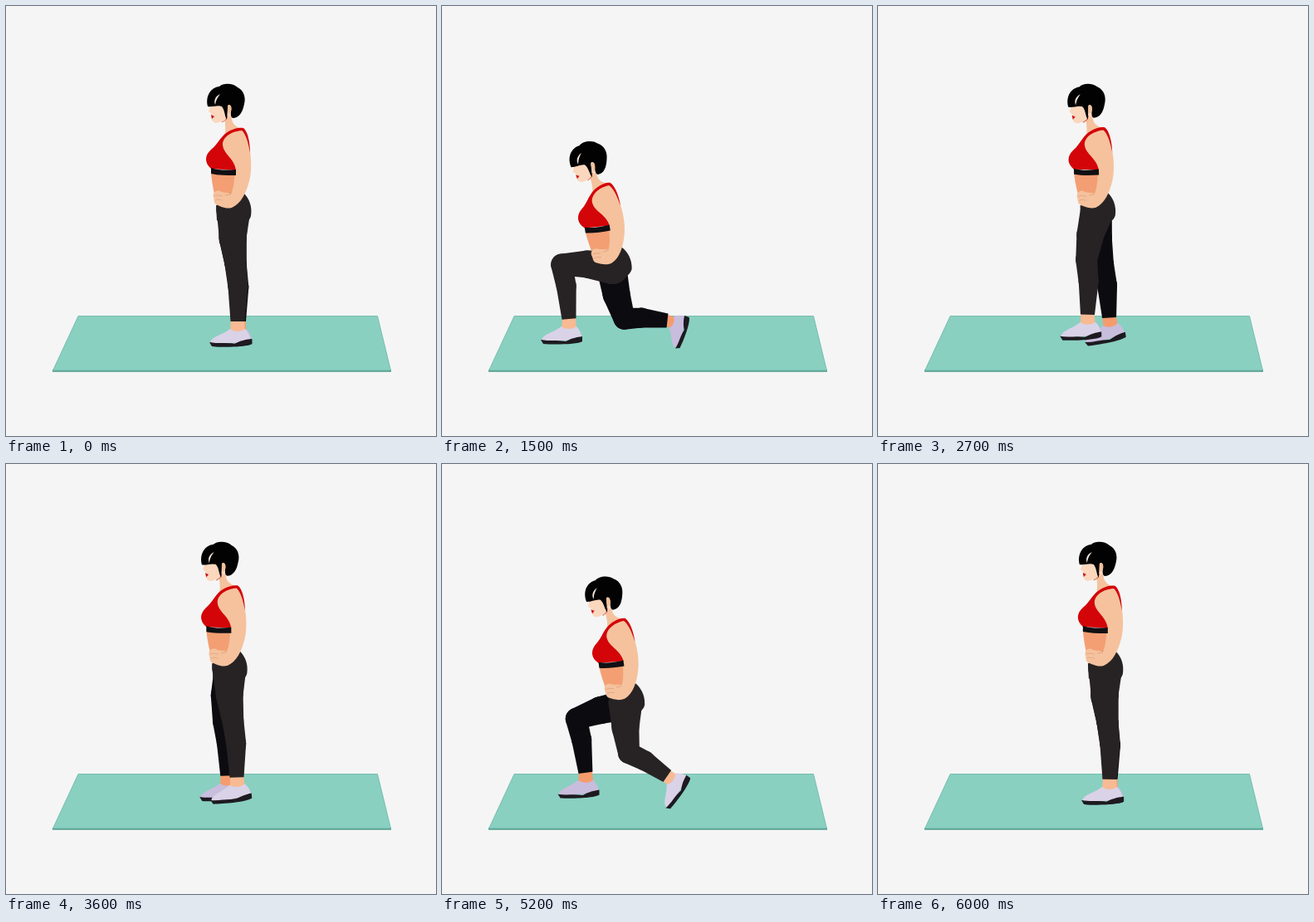
An HTML page with a canvas for the animation above (6200 ms loop, 518 by 518 pixels).

```html
<!DOCTYPE html>
<html lang="en">
<head>
<meta charset="utf-8">
<title>Forward lunges</title>
<style>
  html, body { margin: 0; height: 100%; overflow: hidden; background: #f5f5f5; }
  canvas { display: block; width: 100vw; height: 100vh; }
</style>
</head>
<body>
<canvas id="stage" width="518" height="518"></canvas>
<script>
const ctx = document.getElementById('stage').getContext('2d');
const LOOP = 6200, STEP = 100, LUNGE = 3000, DEEPEST = 1700;
const THIGH = 61, SHIN = 66;
const SKIN = '#f5c29d', BELLY = '#f39f73';
const NEAR = { pants: '#272324', ankle: '#f8ba93', shoe: '#dad2e7' };
const FAR = { pants: '#0c0b10', ankle: '#f59c6e', shoe: '#c8bddd' };

const shape = {
  ankle: new Path2D('M-8 -3H8L9 13H-9Z'),
  shoe: new Path2D('M-33 25C-31 18 -20 17 -9 9C-4 13 4 13 9 9C13 13 15 18 16 24L-31 28Z'),
  sole: new Path2D('M-34 25C-24 27 -14 25 -4 27C4 23 9 22 16 21L16 27C10 31 -20 31 -31 30Z'),
  belly: new Path2D('M247 200H279L282 240H254C251 226 248 215 247 200Z'),
  pelvis: new Path2D('M253 240C264 241 278 238 287 226C293 232 297 242 295 253C292 266 264 268 254 258Z'),
  arm: new Path2D('M270 150C282 146 291 152 293 168C296 185 296 200 293 211C289 226 283 238 272 243C264 245 258 241 253 239C250 237 251 234 250 231C248 224 254 220 260 224L271 226C275 218 275 208 276 197C272 190 256 180 259 164Z'),
  neck: new Path2D('M263 134L272 132C271 141 276 146 286 148L268 174L255 168C264 160 266 152 263 134Z'),
  bra: new Path2D('M247 196C239 189 239 180 247 173C256 166 259 155 270 150C276 147 282 146 286 147C291 151 294 163 294 177C292 165 289 154 284 150C271 151 261 158 261 167C262 179 275 183 277 198Z'),
  band: new Path2D('M247 195C256 198 267 198 277 197V204C266 204 256 204 247 202Z'),
  fingers: new Path2D('M251 229C255 227 258 229 261 229M252 234C256 232 258 234 261 234M264 228L271 227'),
  face: new Path2D('M247 115L246 122L244 127L247 129L247 134C248 140 252 142 257 140C263 138 269 136 271 130L271 112Z'),
  lips: new Path2D('M247 131L251 133L248 136Z'),
  jaw: new Path2D('M260 140C264 138 266 137 267 132'),
  hair: new Path2D('M243 121C240 108 247 98 257 97C262 92 274 93 279 98C287 102 289 111 287 118C285 128 281 135 273 135C269 132 272 127 271 121C269 118 267 119 267 123L266 137C263 132 264 126 260 121C255 119 249 122 243 121Z'),
  parting: new Path2D('M258 106C252 109 250 114 252 119C253 113 255 110 258 106Z'),
  ear: new Path2D('M267 120C270 117 273 122 271 127C270 131 267 130 267 126Z')
};

function fill(path, color) {
  ctx.fillStyle = color;
  ctx.fill(path);
}

function line(path, color, width) {
  ctx.strokeStyle = color;
  ctx.lineWidth = width;
  ctx.stroke(path);
}

function ease(x) {
  return (1 - Math.cos(Math.PI * Math.min(1, Math.max(0, x)))) / 2;
}

// The front foot steps out first, then the body sinks
function poseAt(fromDeepest) {
  const step = ease((1340 - fromDeepest) / 1120);
  const drop = ease((1025 - fromDeepest) / 960);
  const arc = Math.sin(Math.PI * step);
  const shift = 46 * step + 24 * drop;
  return {
    body: { dx: -shift, dy: 72 * drop, lean: 9.5 * step },
    front: { x: 279 - 126 * step, y: 380 - 3 * step - 12.5 * arc, shin: SHIN, angle: -3 * arc, length: 1, lift: 0 },
    back: {
      x: 279 - 9 * step, y: 380 - step - 7 * arc, shin: SHIN - 14 * step,
      angle: -shift, length: 1 - 0.2 * drop * drop, lift: 4 * step
    }
  };
}

// Knee position between hip and ankle, always bent forward
function findKnee([hx, hy], [ax, ay], shin) {
  const distance = Math.hypot(ax - hx, ay - hy);
  const ux = (ax - hx) / distance, uy = (ay - hy) / distance;
  const stretch = Math.max(1, distance / (THIGH + shin));
  const thigh = THIGH * stretch, lower = shin * stretch;
  const along = (thigh ** 2 - lower ** 2 + distance ** 2) / (2 * distance);
  const bend = Math.sqrt(Math.max(0, thigh ** 2 - along ** 2));
  return [hx + along * ux - bend * uy, hy + along * uy + bend * ux, 13];
}

// Tapered segment, round at its start and flat at its end
function taper([ax, ay, ar], [bx, by, br]) {
  const dir = Math.atan2(by - ay, bx - ax), nx = -Math.sin(dir), ny = Math.cos(dir);
  ctx.beginPath();
  ctx.arc(ax, ay, ar, dir + Math.PI / 2, dir - Math.PI / 2);
  ctx.lineTo(bx - nx * br, by - ny * br);
  ctx.lineTo(bx + nx * br, by + ny * br);
  ctx.fill();
}

// Point along a bone, moved sideways to give the muscle its bulge
function muscle(a, b, part, shift, radius) {
  const dx = b[0] - a[0], dy = b[1] - a[1], length = Math.hypot(dx, dy);
  return [a[0] + dx * part - dy / length * shift, a[1] + dy * part + dx / length * shift, radius];
}

function drawLeg(hip, foot, colors) {
  ctx.save();
  ctx.translate(foot.x, foot.y);
  ctx.rotate(foot.angle * Math.PI / 180);
  ctx.translate(0, -foot.lift);
  ctx.scale(foot.length, 1);
  fill(shape.ankle, colors.ankle);
  fill(shape.shoe, colors.shoe);
  fill(shape.sole, '#1d1a20');
  ctx.restore();

  const ankle = [foot.x, foot.y, 8.5], knee = findKnee(hip, ankle, foot.shin);
  const thigh = muscle(hip, knee, 0.5, 2, 16.5), calf = muscle(knee, ankle, 0.4, -2, 12);
  ctx.fillStyle = colors.pants;
  [hip, thigh, knee, calf, ankle].reduce((a, b) => {
    taper(a, b);
    ctx.beginPath();
    ctx.arc(...a, 0, 2 * Math.PI);
    ctx.fill();
    return b;
  });
}

function inBody({ dx, dy, lean }, draw) {
  ctx.save();
  ctx.translate(262 + dx, 235 + dy);
  ctx.rotate(-lean * Math.PI / 180);
  ctx.translate(-262, -235);
  draw();
  ctx.restore();
}

function drawUpperBody() {
  fill(shape.neck, SKIN);
  fill(shape.arm, SKIN);
  line(shape.fingers, '#dfa07e', 0.8);
  fill(shape.bra, '#d30509');
  fill(shape.band, '#111013');
  fill(shape.face, '#fad7bd');
  line(shape.jaw, '#d9644c', 1);
  fill(shape.lips, '#c8131c');
  fill(shape.hair, '#020203');
  fill(shape.parting, '#f4e8e0');
  fill(shape.ear, '#f3c19b');
}

function drawMat() {
  fill(new Path2D('M56 438H464V440.7H56Z'), '#519b8d');
  const top = new Path2D('M87 373.5H447.5L463.5 439H56.5Z');
  fill(top, '#89d0c1');
  line(top, '#6ab7a7', 0.8);
}

function draw(t) {
  const second = t >= DEEPEST + LUNGE / 2;
  const { body, front, back } = poseAt(Math.abs(t - DEEPEST - (second ? LUNGE : 0)));
  const hip = [274 + body.dx, 246 + body.dy, 20.5];

  ctx.fillStyle = '#f5f5f5';
  ctx.fillRect(0, 0, 518, 518);
  drawMat();

  ctx.save();
  ctx.translate(1.5, 0);
  drawLeg([hip[0] - 2, hip[1] + 3, 18], second ? front : back, FAR);
  ctx.restore();
  inBody(body, () => fill(shape.belly, BELLY));
  drawLeg(hip, second ? back : front, NEAR);
  inBody(body, () => {
    fill(shape.pelvis, NEAR.pants);
    drawUpperBody();
  });
}

function tick() {
  draw(Math.floor(performance.now() % LOOP / STEP) * STEP);
  requestAnimationFrame(tick);
}
tick();
</script>
</body>
</html>
```
